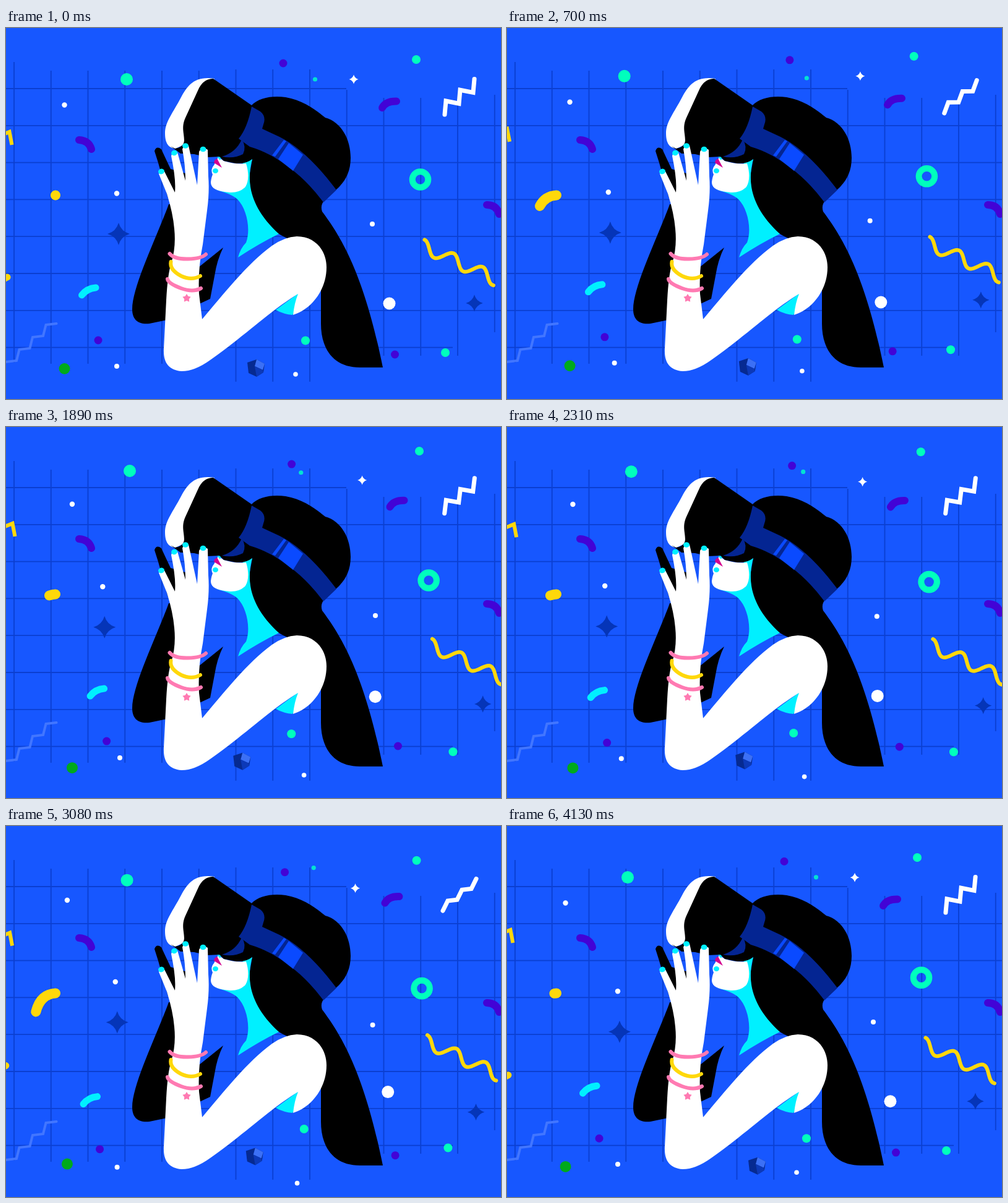
Recreate the animation shown at these times as an HTML page. Size 800x600 px, loop 4200 ms.

```html
<!DOCTYPE html>
<html lang="en">
<head>
<meta charset="utf-8">
<title>Virtual reality</title>
<style>
  html, body { margin: 0; width: 100%; height: 100%; overflow: hidden; background: #1757ff; }
  svg { display: block; width: 100vw; height: 100vh; }
  .line { fill: none; stroke-linecap: round; }
  .white { fill: #fff; }
  .mint { fill: #00ffbd; }
  .cyan { fill: #00f0ff; }
  .purple { fill: #4203d6; }
  .navy { fill: #0535b8; }
  .strap { fill: #042592; }
</style>
</head>
<body>
<svg viewBox="0 0 800 600">
  <defs>
    <path id="spark" d="M0-18Q4-4 18 0Q4 4 0 18Q-4 4-18 0Q-4-4 0-18Z"/>
    <ellipse id="nail" class="cyan" rx="5" ry="4.3"/>
  </defs>
  <rect width="800" height="600" fill="#1757ff"/>
  <path id="grid" fill="none" stroke="#0b3fd0" stroke-width="1.8"/>

  <!-- still confetti -->
  <g class="line" stroke="#4203d6" stroke-width="12">
    <path d="M118 181Q134 182 138 196"/>
    <path d="M777 286Q793 286 797 301"/>
  </g>
  <path id="stairs" class="line" stroke="#4276ff" stroke-width="4"/>
  <path id="zigzag" class="line" stroke="#fff" stroke-width="7"/>
  <path id="worm" class="line" stroke="#ffd80a" stroke-width="16" pathLength="1" d="M80 270.5Q54 272 47.5 304"/>

  <!-- drifting confetti, one group per route -->
  <g id="a">
    <circle class="purple" cx="448" cy="57" r="6.5"/>
    <circle class="purple" cx="149" cy="505" r="6.5"/>
    <circle class="white" cx="468" cy="560" r="3.8"/>
    <circle cx="669.5" cy="245" r="12.8" fill="none" stroke="#00ffbd" stroke-width="10"/>
    <use href="#spark" class="white" transform="translate(562 83) scale(.42)"/>
    <use href="#spark" class="navy" transform="translate(757 445) scale(.76)"/>
    <path class="line" stroke="#00f0ff" stroke-width="11" d="M122.5 432Q131 421 145 420"/>
  </g>
  <g id="b">
    <circle cx="499.5" cy="83" r="3.6" fill="#04e2d2"/>
    <circle class="white" cx="179" cy="267.5" r="4.2"/>
    <circle class="white" cx="619.5" cy="445.5" r="10"/>
    <circle class="mint" cx="484" cy="505.5" r="7"/>
    <use href="#spark" class="navy" x="182" y="333"/>
    <path class="line" stroke="#ffd80a" stroke-width="11" d="M2 403Q-8 407-13 418"/>
    <g transform="translate(404 550)">
      <path fill="#062a91" d="M-14-9L1-14 14-7 12 7 1 14-12 8Z"/>
      <path fill="#3c70f5" d="M1-14L14-7 11 3-2-3Z"/>
      <path fill="#0c39b8" d="M11 3L12 7 1 14-2-3Z"/>
    </g>
  </g>
  <g id="c">
    <circle class="mint" cx="195" cy="83" r="10"/>
    <circle class="mint" cx="663" cy="51" r="7"/>
    <circle class="white" cx="592" cy="317" r="4"/>
    <circle class="white" cx="179" cy="547" r="4"/>
    <circle class="purple" cx="628.5" cy="528" r="6.5"/>
    <path fill="none" stroke="#ffd80a" stroke-width="6" d="M-14 176L5.5 168 9.5 189"/>
  </g>
  <g id="d">
    <circle class="white" cx="94.5" cy="124.5" r="4.2"/>
    <circle cx="94.5" cy="551" r="9" fill="#00aa1c"/>
    <circle class="mint" cx="710" cy="525" r="7"/>
    <path class="line" stroke="#4203d6" stroke-width="12" d="M608 129Q614 118 631 118.5"/>
    <path id="wave" class="line" stroke="#ffd80a" stroke-width="6" transform="translate(676.5 342.5) rotate(25)"/>
  </g>

  <!-- hair and hidden hand -->
  <path d="M263 285C243 340 204 418 204 455C204 472 214 480 232 478L275 469V285Z"/>
  <path d="M300 396L351 355Q341 375 337 401L330 438 300 452Z"/>
  <path d="M240 199Q243 190 251 196L266 228 290 235V275H262L246 218Z"/>
  <path d="M396 126C408 112 432 109 452 112C480 117 500 132 516 145C542 152 557 180 557 210C557 234 547 250 533 262
    C513 277 507 285 511 297C545 342 580 405 609 549H572C530 549 509 520 509 478V400L470 345C410 330 391 275 394 235L398 212 370 195Z"/>

  <!-- neck and face -->
  <path class="cyan" d="M398 212C389 245 391 287 441 333Q410 348 375 371Q379 356 388 347C396 325 389 292 374 277Q363 267 338 262L362 266 388 254 382 216Z"/>
  <path class="white" d="M343 209L352 215Q372 221 388 219C394 238 391 252 386 258Q376 267 361 266C343 264 331 261 331 249Q332 241 334 237 330 229 336 222Z"/>
  <path class="cyan" d="M341 208L348 209 346 214Z"/>
  <ellipse class="cyan" cx="338.5" cy="231" rx="4.5" ry="4"/>
  <path fill="#d3008f" d="M337 214L341 211 349 226 336 218Z"/>

  <!-- headset -->
  <path class="white" d="M337 82C304 77 293 94 283 112C270 137 257 152 257 170C257 187 263 194 274 195L291 187 310 130Z"/>
  <path d="M335 82L397 125 394 155 379 182 386 195 398 212Q388 220 372 219L352 215 345 208 325 209 304 204 282 203 266 191 273 195Q287 193 288 182C288 170 283 160 290 145L312 97Q320 82 335 82Z"/>
  <path class="strap" d="M381 180Q389 192 383 204Q368 212 349 208Q372 201 381 180Z"/>
  <path class="strap" d="M397 127L411 135Q421 143 416 156L414 163 442 176Q486 198 534 262L513 282Q487 247 458 226Q428 202 394 192L376 179Q390 162 397 127Z"/>
  <path fill="#0a4aff" d="M457 186L480 205 464 231 440 212ZM449 181L453 183 435 208 430 206Z"/>

  <!-- arm and hand -->
  <path class="cyan" d="M436 456L474 428Q472 450 463 464Q449 463 436 456Z"/>
  <path class="white" d="M470 337C500 337 518 360 518 387C518 426 491 456 464 464Q466 445 472 430C430 455 388 496 330 537
    Q305 555 284 555C262 553 254 540 255 519L259 440Q261 400 267 380Q275 355 272 325Q270 300 260 268L247 236Q249 228 256 232L273 266
    Q275 245 267 207Q269 198 277 201L290 247Q290 222 285 196Q288 187 295 190L309 254 312 200Q317 191 326 197L327 240
    Q329 265 325 295L318 350Q310 390 312 430L317 471C352 430 390 381 430 352Q450 338 470 337Z"/>
  <use href="#nail" transform="translate(251 232) rotate(-20)"/>
  <use href="#nail" transform="translate(272 202) rotate(-15)"/>
  <use href="#nail" x="290" y="190.5"/>
  <use href="#nail" x="318.5" y="196"/>

  <!-- bracelets -->
  <g class="line" stroke="#ff7ab2" stroke-width="6">
    <path d="M264.5 365Q272 374 294 373.5T323 366"/>
    <path stroke="#ffd80a" d="M266.5 378Q264 391 283 401Q300 409 314 401"/>
    <path d="M261 406Q262 413 283 421Q302 428 315 421"/>
  </g>
  <path id="charm" fill="#ff7ab2"/>
</svg>
<script>
  const LOOP = 4200, STEP = 70;
  // each route starts at home, eases through three stops and returns
  const routes = {
    a: [[0, 0], [12, -7], [13.8, 4.2], [2.4, 17.8]],
    b: [[0, 0], [-20.5, -2.7], [-23, -10], [-2, -15.5]],
    c: [[0, 0], [-7.2, -7], [6.4, -12.6], [.5, 4.9]],
    d: [[0, 0], [9.5, -6.4], [12.8, 1], [4.3, -4.5]]
  };
  const $ = id => document.getElementById(id);
  const range = n => [...Array(n).keys()];
  const trace = points => 'M' + points.map(p => p.join(' ')).join('L');
  const ease = u => u * u * (3 - 2 * u);
  const mix = (from, to, u) => from + (to - from) * u;

  function drawGrid() {
    // first column of each band, with its top and bottom
    const bands = [[0, 55, 541], [1, 69, 543], [6, 67, 572], [9, 100, 540], [10, 113, 530], [13, 108, 492]];
    const columns = range(14).map(i => {
      const [, top, bottom] = bands.findLast(band => band[0] <= i);
      return `M${13 + i * 59.75} ${top}V${bottom}`;
    });
    const ends = { 0: 550, 7: 722 };
    const rows = range(8).map(i => `M0 ${98 + i * 59.8}H${ends[i] || 800}`);
    $('grid').setAttribute('d', columns.join('') + rows.join(''));
  }

  function drawStill() {
    $('wave').setAttribute('d', trace(range(67).map(i => [2 * i, 10 - 10 * Math.cos(i * Math.PI / 13)])));
    $('stairs').setAttribute('d', trace(range(8).map(i =>
      [Math.floor(i / 2) * 21.5 + i % 2 * 17, 540 - Math.floor(i / 2) * 20 - i % 2 * 2])));
    $('charm').setAttribute('d', trace(range(10).map(i => {
      const angle = i * Math.PI / 5, r = i % 2 ? 4 : 7;
      return [292 + r * Math.sin(angle), 437 - r * Math.cos(angle)];
    })) + 'Z');
  }

  function draw(now) {
    const t = Math.floor(now % LOOP / STEP) * STEP;
    const leg = t / LOOP * 4, from = Math.floor(leg), u = ease(leg - from);
    for (const [id, stops] of Object.entries(routes)) {
      const next = stops[(from + 1) % 4];
      const [x, y] = stops[from].map((v, k) => mix(v, next[k], u));
      $(id).setAttribute('transform', `translate(${x} ${y})`);
    }

    const swing = 1 - Math.abs(1 - 2 * (t / (LOOP / 2) % 1));
    $('worm').setAttribute('stroke-dasharray', `${Math.max(.001, swing)} 2`);
    const bend = ease(swing);
    $('zigzag').setAttribute('d', trace(range(6).map(i => {
      const stair = Math.floor(i / 2), rise = i % 2;
      return [709 - 3 * bend + 23 * stair + rise * (2 + 6 * bend),
        140 - 3 * bend - 17.8 * stair - rise * (22 - 6 * bend)];
    })));
    requestAnimationFrame(() => draw(performance.now() - start));
  }

  drawGrid();
  drawStill();
  const start = performance.now();
  draw(0);
</script>
</body>
</html>
```
